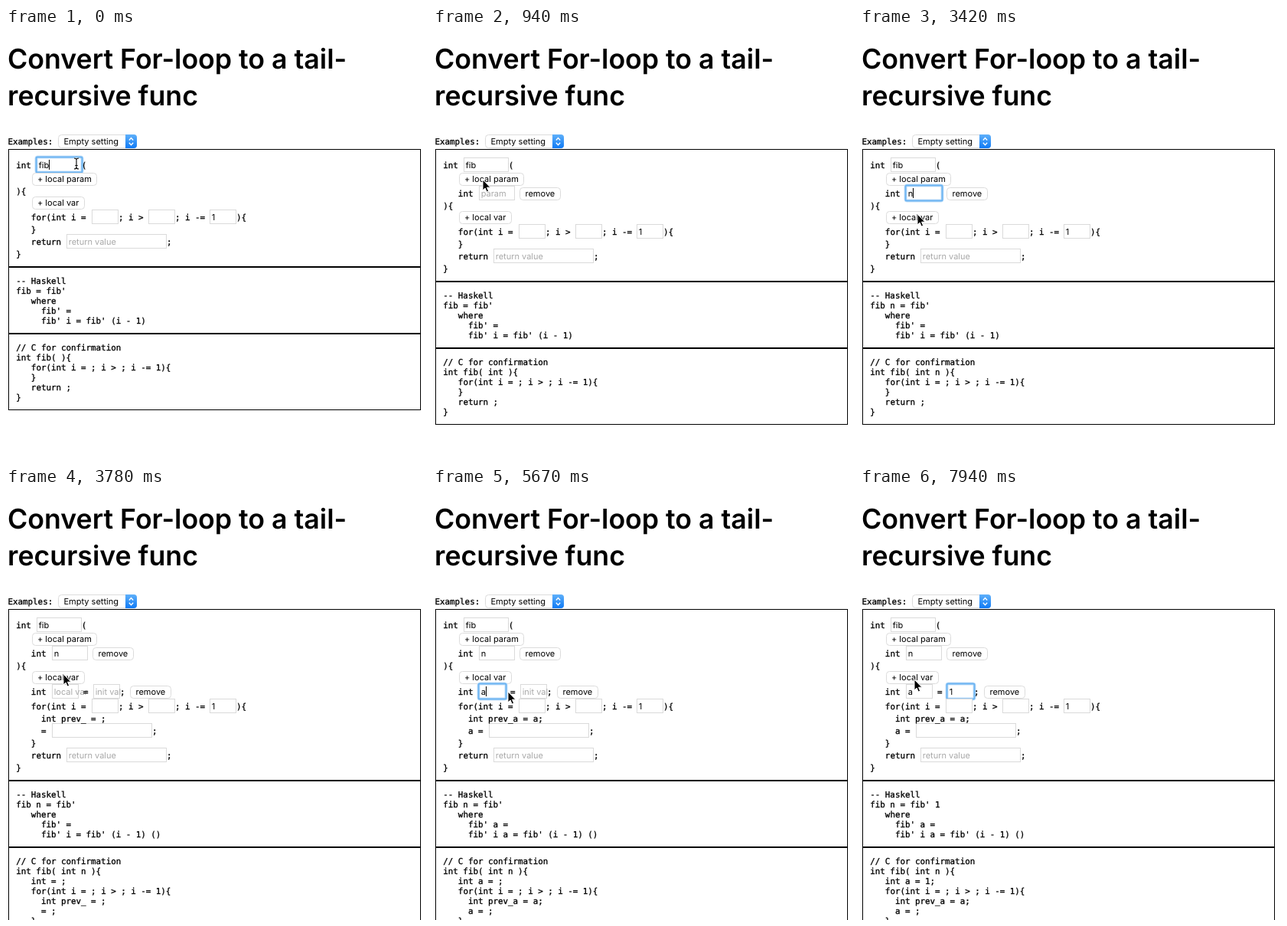
An HTML page that plays this animation: 550x564 px, repeating every 8000 ms.

```html
<!DOCTYPE html>
<html lang="en">
<head>
<meta charset="utf-8">
<title>Convert For-loop to a tail-recursive func</title>
<style>
html, body { margin: 0; width: 100%; height: 100%; overflow: hidden; background: #fff; }
svg { display: block; width: 550px; height: 564px; }
svg svg { width: auto; height: auto; }
text { text-rendering: geometricPrecision; white-space: pre; }
.head { font: 600 35.7px Inter, "Noto Sans", sans-serif; }
.code { font: 10.84px "DejaVu Sans Mono", monospace; stroke: #000; stroke-width: .3; }
.ui { font: 11px Inter, "Liberation Sans", sans-serif; }
.hint { fill: #a9a9a9; }
.field { fill: #fff; stroke: #dadada; }
.button { fill: #fff; stroke: #dcdcdc; }
.glow { fill: none; stroke: #c3e0f9; stroke-width: 4; }
.ring { fill: none; stroke: #6cb4f2; stroke-width: 2; }
.panel { fill: none; stroke: #000; }
</style>
</head>
<body>
<svg viewBox="0 0 550 564">
  <defs>
    <linearGradient id="blue" x2="0" y2="1"><stop stop-color="#5fb0fa"/><stop offset="1" stop-color="#0f7af5"/></linearGradient>
    <path id="beamLine" d="M-3-7Q0-7 0-5V5Q0 7-3 7M3-7Q0-7 0-5M0 5Q0 7 3 7M-1.7 2.5H1.7"/>
  </defs>
  <text class="head" x="2" y="53">Convert For-loop to a tail-</text>
  <text class="head" x="2" y="101">recursive func</text>
  <text class="code" x="2.5" y="152">Examples:</text>
  <rect class="button" x="68.5" y="139.5" width="102" height="17" rx="4"/>
  <path fill="url(#blue)" d="M156 139h11a4 4 0 0 1 4 4v10a4 4 0 0 1-4 4h-11z"/>
  <path fill="none" stroke="#fff" stroke-width="1.3" d="M160.8 146.5l2.7-3 2.7 3M160.8 149.8l2.7 3 2.7-3"/>
  <text class="ui" x="75.5" y="152">Empty setting</text>
  <g id="page"></g>
  <rect id="caret" width="1" height="13"/>
  <path id="arrow" stroke="#fff" d="M0 0V14L3.1 11L5.2 16L7.6 15L5.5 10.2H9.9Z"/>
  <g id="beam" fill="none">
    <use href="#beamLine" stroke="#fff" stroke-width="2.4" stroke-opacity=".7"/>
    <use href="#beamLine" stroke="#000" stroke-width="1.1"/>
  </g>
</svg>
<script>
const LOOP = 8000, CHAR = 6.52, LEFT = 13.3;
const $ = id => document.getElementById(id);
const at = (table, t) => table.filter(row => row[0] <= t).pop();

// time, focused field, parameter, local variable, initial value (null: row absent)
const scenes = [
  [0, "name", null, null, ""],
  [940, "", "", null, ""],
  [1650, "param", "", null, ""],
  [2480, "param", "n", null, ""],
  [3780, "", "n", "", ""],
  [4490, "local", "n", "", ""],
  [5440, "local", "n", "a", ""],
  [6030, "init", "n", "a", ""],
  [6990, "init", "n", "a", "1"]
];

// time, x, y; x = 0 hides the caret
const carets = [
  [0, 56, 172], [470, 0, 0],
  [1650, 63, 209], [2120, 0, 0], [2480, 69, 209], [2950, 0, 0], [3420, 69, 209], [3780, 0, 0],
  [4490, 63, 259], [4970, 0, 0], [5440, 69, 259], [5910, 0, 0],
  [6030, 117, 259], [6510, 0, 0], [6990, 122, 259], [7470, 0, 0]
];

// time, shape, x, y
const pointer = [
  [0, "beam", 92, 177], [240, "beam", 90, 180], [350, "arrow", 80, 190],
  [470, "arrow", 71, 196], [590, "arrow", 66, 198], [710, "arrow", 65, 198],
  [1300, "beam", 78, 211], [1410, "beam", 82, 216],
  [2480, ""], [2950, "beam", 83, 216], [3070, "beam", 83, 220],
  [3190, "arrow", 79, 232], [3300, "arrow", 76, 241], [3420, "arrow", 75, 243],
  [4140, "beam", 83, 260], [4250, "beam", 86, 267],
  [5440, ""], [5560, "beam", 88, 267], [5670, "arrow", 98, 266],
  [5790, "beam", 112, 267], [5910, "beam", 118, 267],
  [6990, ""], [7230, "beam", 117, 268], [7350, "arrow", 108, 273],
  [7470, "arrow", 95, 274], [7590, "arrow", 83, 266], [7700, "arrow", 76, 256],
  [7820, "arrow", 72, 251], [7940, "arrow", 71, 250]
];

const text = (kind, x, y, s) => `<text class="${kind}" x="${x}" y="${y}">${s}</text>`;
const code = (x, y, s) => text("code", x, y, s);
const box = (kind, x, y, w, h, r = 0) =>
  `<rect class="${kind}" x="${x + .5}" y="${y + .5}" width="${w - 1}" height="${h - 1}" rx="${r}"/>`;
const button = (x, y, w, pad, label) => box("button", x, y, w, 17, 4) + text("ui", x + pad, y + 12, label);
const words = (...parts) => parts.filter(Boolean).join(" ");

function field(x, y, w, value, hint = "", focused = false) {
  const label = value ? text("ui", 2.7, 14, value) : text("ui hint", 2.7, 14, hint);
  const ring = focused ? box("glow", x - 1, y - 1, w + 2, 21, 2) + box("ring", x - 1, y - 1, w + 2, 21, 1.5) : "";
  return box("field", x, y, w, 19) +
    `<svg x="${x}" y="${y}" style="width:${w - 2}px;height:19px">${label}</svg>` + ring;
}

function panel(top, lines) {
  const h = lines.length * 13 + 22;
  return box("panel", 3, top, 539, h) +
    lines.map(([indent, s], i) => code(LEFT + indent * CHAR, top + 22 + i * 13, s)).join("");
}

function form(focus, param, local, init) {
  const hasParam = param !== null, hasLocal = local !== null;
  const in1 = LEFT + 3 * CHAR, in2 = LEFT + 5 * CHAR;
  let out = code(LEFT, 183, "int") + field(40, 169, 59, "fib", "", focus === "name") +
    code(98.7, 183, "(") + button(34, 189, 85, 7, "+ local param");
  let y = 237;
  if (hasParam) {
    out += code(in1, 220, "int") + field(60, 206, 47, param, "param", focus === "param") +
      button(113, 208, 54, 7.5, "remove");
    y += 19;
  }
  out += code(LEFT, y - 20, "){") + button(34, y - 17, 69, 7, "+ local var");
  if (hasLocal) {
    out += code(in1, y + 14, "int") + field(60, y, 35, local, "local var", focus === "local") +
      code(101, y + 14, "=") + field(114, y, 35, init, "init val", focus === "init") +
      code(149, y + 14, ";") + button(162, y + 2, 54, 7.5, "remove");
    y += 19;
  }
  out += code(in1, y + 14, "for(int i =") + field(112, y, 35, "") +
    code(147, y + 14, "; i &gt;") + field(186, y, 35, "") +
    code(221, y + 14, "; i -=") + field(266, y, 35, "1") + code(301, y + 14, "){");
  if (hasLocal) {
    const x = local ? 73 : 60;
    out += field(x, y + 32, 131, "") + code(in2, y + 30, `int prev_${local} = ${local};`) +
      code(in2, y + 46, words(local, "=")) + code(x + 131, y + 46, ";");
    y += 32;
  }
  out += code(in1, y + 30, "}") + code(in1, y + 46, "return") +
    field(79, y + 32, 131, "", "return value") + code(210, y + 46, ";") + code(LEFT, y + 62, "}");
  const end = y + 75;
  return [out + box("panel", 3, 158, 539, end - 158), end];
}

function page([, focus, param, local, init]) {
  const hasLocal = local !== null;
  const [top, end] = form(focus, param, local, init);
  const haskell = [
    [0, "-- Haskell"],
    [0, words("fib", param, "= fib'", init)],
    [3, "where"],
    [5, words("fib'", local, "=")],
    [5, words("fib' i", local, "= fib' (i - 1)", hasLocal && "()")]
  ];
  const c = [
    [0, "// C for confirmation"],
    [0, words("int fib(", param !== null && "int", param, "){")],
    ...(hasLocal ? [[3, words("int", local, "=", init + ";")]] : []),
    [3, "for(int i = ; i &gt; ; i -= 1){"],
    ...(hasLocal ? [[5, `int prev_${local} = ${local};`], [5, words(local, "= ;")]] : []),
    [3, "}"],
    [3, "return ;"],
    [0, "}"]
  ];
  return top + panel(end, haskell) + panel(end + 87, c);
}

let shown;
function draw(t) {
  const scene = at(scenes, t);
  if (scene !== shown) $("page").innerHTML = page(shown = scene);

  const [, cx, cy] = at(carets, t);
  $("caret").setAttribute("x", cx);
  $("caret").setAttribute("y", cy);
  $("caret").style.display = cx ? "" : "none";

  const [, shape, x, y] = at(pointer, t);
  for (const id of ["arrow", "beam"]) {
    $(id).style.display = id === shape ? "" : "none";
    if (id === shape) $(id).setAttribute("transform", `translate(${x} ${y})`);
  }
}

const start = performance.now();
function tick() {
  draw((performance.now() - start) % LOOP);
  requestAnimationFrame(tick);
}
tick();
</script>
</body>
</html>
```
